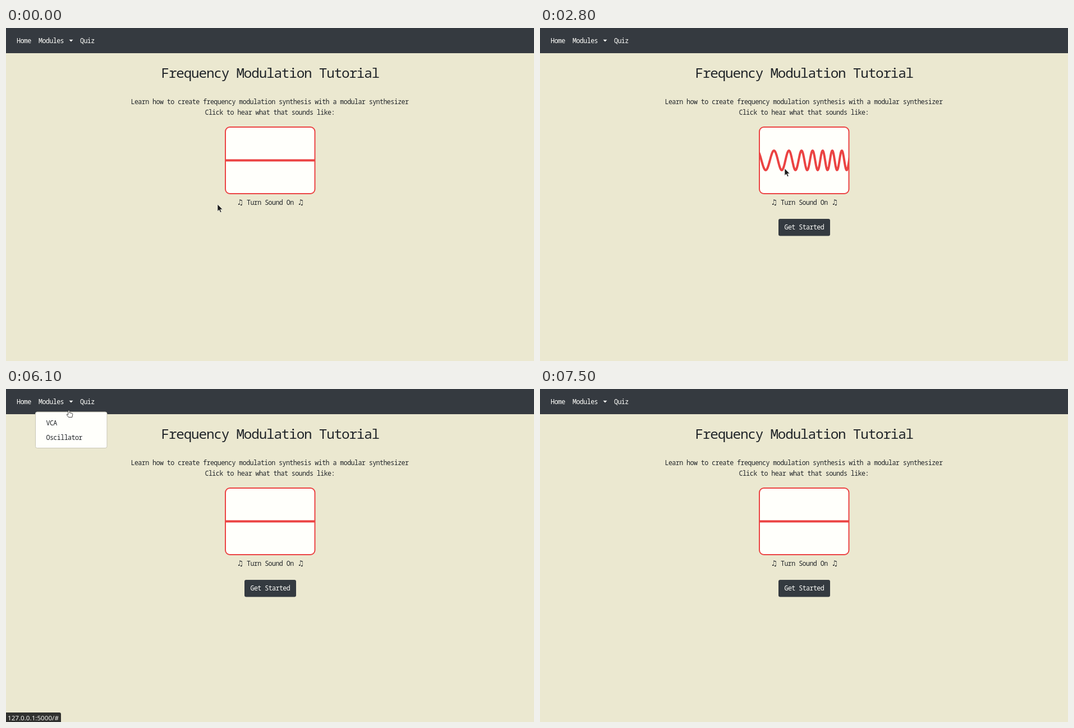
These frames come from a looping animation (941x595 px, 8000 ms). An HTML page:

```html
<!DOCTYPE html>
<html lang="en">
<head>
<meta charset="utf-8">
<title>Frequency Modulation Tutorial</title>
<style>
html, body { margin: 0; width: 100%; height: 100%; overflow: hidden; background: #ebe8d0; }
svg { display: block; }
text { font: 11.7px "Noto Sans Mono", "DejaVu Sans Mono", monospace; letter-spacing: -.05em; fill: #212529; }
.light { fill: #fffffb; }
.title { font-size: 24.37px; font-weight: 500; }
.note { font: 13px "DejaVu Sans", sans-serif; text-anchor: middle; letter-spacing: 0; }
.url { font: 11.65px "Noto Sans", "Open Sans", sans-serif; letter-spacing: 0; fill: #f4f4f0; }
</style>
</head>
<body>
<svg width="941" height="595" viewBox="0 0 941 595">
  <defs><clipPath id="screen"><rect x="391" y="177" width="160" height="119" rx="8"/></clipPath></defs>

  <rect width="941" height="45" fill="#353a40"/>
  <text class="light" x="19" y="27">Home</text>
  <text class="light" x="58" y="27">Modules</text>
  <path class="light" d="M112.5 20.8h7l-3.5 3.6z"/>
  <text class="light" x="132" y="27">Quiz</text>

  <text class="title" x="276.5" y="88.5">Frequency Modulation Tutorial</text>
  <text x="222.5" y="135.5">Learn how to create frequency modulation synthesis with a modular synthesizer</text>
  <text x="354.5" y="155">Click to hear what that sounds like:</text>

  <rect x="391" y="177" width="159.5" height="119" rx="8" fill="#fffffb" stroke="#eb4343" stroke-width="2"/>
  <path id="wave" fill="none" stroke="#eb4343" stroke-width="4" stroke-linejoin="round" clip-path="url(#screen)"/>
  <text class="note" x="417" y="316">♫</text>
  <text x="429" y="316">Turn Sound On</text>
  <text class="note" x="525" y="316">♫</text>

  <g id="start">
    <rect x="425" y="341" width="92" height="30.5" rx="3" fill="#343a40"/>
    <text class="light" x="435.5" y="360">Get Started</text>
  </g>

  <g id="menu">
    <rect x="52.5" y="41" width="127.5" height="64.5" rx="3" fill="#fffffb" stroke="#c9c7b6"/>
    <text x="71.5" y="65">VCA</text>
    <text x="71.5" y="91">Oscillator</text>
  </g>

  <g id="status">
    <path id="tab" fill="#30312f"/>
    <text id="url" class="url" x="3" y="592"></text>
  </g>

  <path id="arrow" d="M0 0V12.5L2.9 9.9L5 14.6L7 13.7L5 9.2H9Z" fill="#1c1c1c" stroke="#fffffb" stroke-width=".6"/>
  <path id="hand" d="M-1.2 7V.8Q0-.8 1.2.8V4.5L6 5.6Q7 6 6.8 7.5L5.8 12.5H-.5L-3.8 8Q-3.5 6-1.2 7.8Z" fill="#fffffb" stroke="#1c1c1c" stroke-width=".8"/>
</svg>
<script>
const $ = id => document.getElementById(id);
const LOOP = 8000, STEP = 100;

// Each list holds [time in ms, value...]; a value stays until the next entry.
const loudness = [
  [0, 0], [1400, 41.5], [1600, 25.5], [1800, 11.5], [2100, 2], [2200, 0],
  [2500, 41.5], [2600, 33.5], [2800, 17.5], [2900, 9.5], [3100, 0],
  [7100, 37.5], [7200, 29.5], [7300, 21.5], [7400, 9.5], [7500, 0]
];
const pointer = [
  [0, "arrow", 377, 315], [700, "arrow", 394, 299], [800, "arrow", 424, 266], [900, "arrow", 436, 251],
  [3400, "arrow", 344, 157], [3600, ""],
  [3800, "hand", 129, 7], [3900, "hand", 122, 13], [4000, "hand", 116, 18], [4100, "hand", 113, 21],
  [6100, "hand", 112, 38], [6200, "hand", 112, 58], [6300, "hand", 118, 82],
  [6400, "arrow", 136, 118], [6500, "arrow", 151, 150], [6600, "arrow", 158, 168],
  [6900, "arrow", 300, 212], [7000, "arrow", 436, 251], [7500, ""]
];
const link = [
  [0, "#", 0], [3900, "#", .25], [4000, "#", .5], [4100, "#", .75], [4200, "#", 1],
  [6200, "vca", 1], [6300, "vco", 1], [6500, "vco", .75], [6600, "vco", .45], [6700, "vco", 0]
];

const at = (keys, t) => keys.filter(key => key[0] <= t).pop().slice(1);
const show = (id, on) => $(id).style.display = on ? "" : "none";

// Carrier phase in cycles, with its frequency swinging across the screen.
const phase = (x, shift) =>
  .046 * (x - 417) + .538 * (.507 - Math.cos((x - 460) / 41.38 + shift));

function wavePath(amp, t) {
  const shift = (t - 2800) / 130;
  let d = "";
  for (let x = 389; x <= 553; x++) {
    const y = 236.5 - amp * Math.cos(2 * Math.PI * phase(x, shift));
    d += (d ? "L" : "M") + x + " " + y.toFixed(2);
  }
  return d;
}

function draw(t) {
  $("wave").setAttribute("d", wavePath(at(loudness, t)[0], t));
  show("start", t >= 1300);
  show("menu", t >= 4500 && t < 7100);

  const [page, opacity] = at(link, t);
  $("status").style.opacity = opacity;
  $("url").textContent = "127.0.0.1:5000/" + page;
  $("tab").setAttribute("d", `M0 578H${page === "#" ? 95 : 105}q3 0 3 3V595H0Z`);

  const [kind, x, y] = at(pointer, t);
  for (const id of ["arrow", "hand"]) {
    show(id, id === kind);
    if (id === kind) $(id).setAttribute("transform", `translate(${x} ${y})`);
  }
}

const begin = performance.now();
function tick() {
  const t = (performance.now() - begin) % LOOP;
  draw(Math.floor(t / STEP) * STEP);
  requestAnimationFrame(tick);
}
tick();
</script>
</body>
</html>
```
